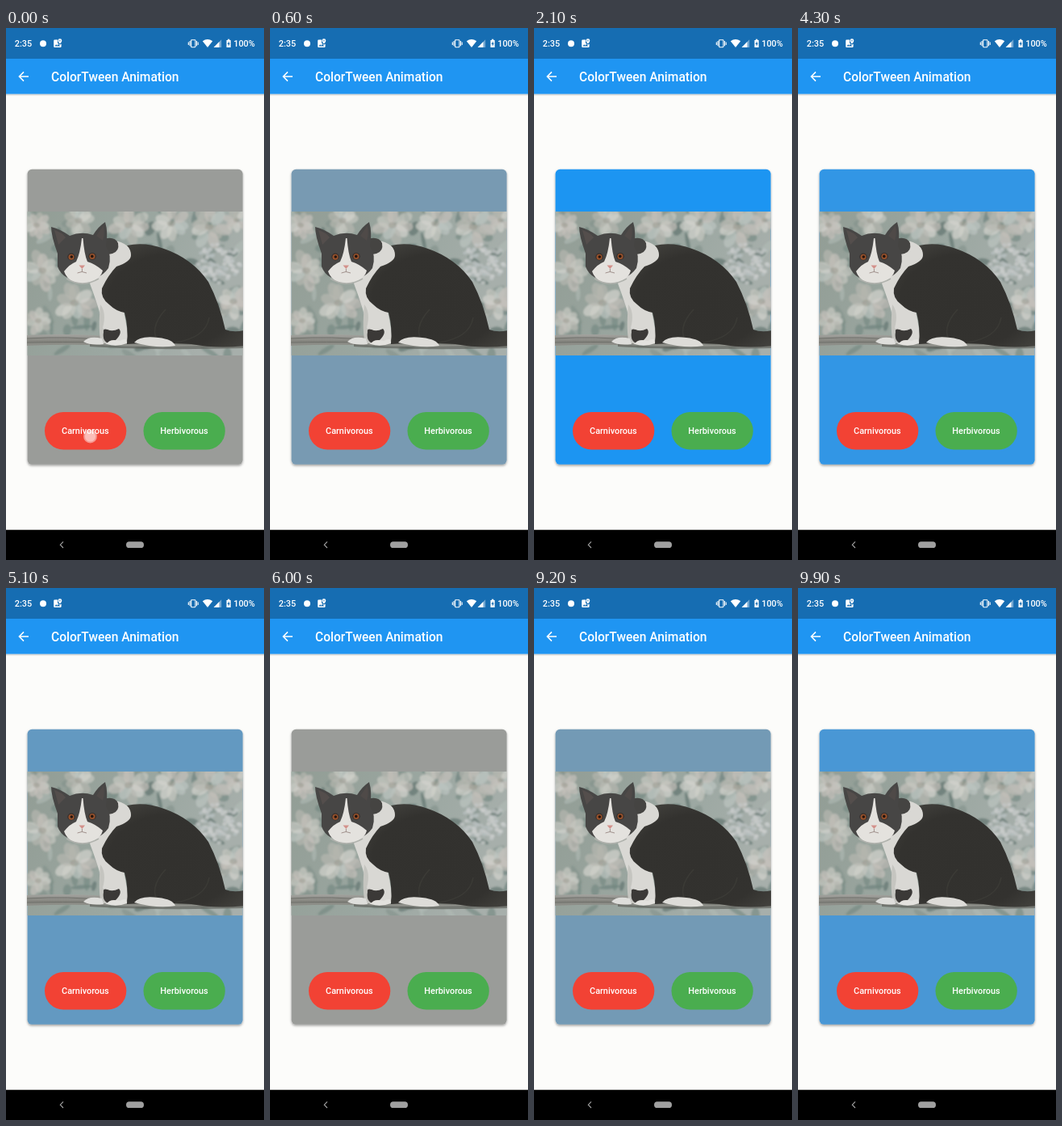
Recreate the animation shown at these times as an HTML page. Size 320x658 px, loop 10 s.

```html
<!DOCTYPE html>
<html lang="en">
<head>
<meta charset="utf-8">
<title>ColorTween Animation</title>
<style>
  html, body { margin: 0; width: 100%; height: 100%; overflow: hidden; background: #fcfcfa; }
  svg { display: block; width: 100%; height: 100%; }
  text { font-family: Roboto, sans-serif; font-weight: 500; font-size: 10.9px; fill: #fff; }
</style>
</head>
<body>
<svg viewBox="0 0 320 658">
  <defs>
    <filter id="shade" x="-10%" y="-10%" width="120%" height="120%">
      <feDropShadow dx="0" dy="1.6" stdDeviation="1.5" flood-color="#000" flood-opacity=".38"/>
    </filter>
    <filter id="soft"><feGaussianBlur stdDeviation="1.2"/></filter>
    <filter id="fur"><feGaussianBlur stdDeviation=".6"/></filter>
    <clipPath id="frame"><rect x="26.6" y="227" width="267" height="178"/></clipPath>
    <linearGradient id="wall" x2="1" y2=".3">
      <stop offset="0" stop-color="#929d95"/>
      <stop offset=".6" stop-color="#9ba7a1"/>
      <stop offset="1" stop-color="#a7afab"/>
    </linearGradient>
    <linearGradient id="plank" x2="0" y2="1">
      <stop offset="0" stop-color="#a3a39f"/>
      <stop offset=".55" stop-color="#85857f"/>
      <stop offset="1" stop-color="#92948e"/>
    </linearGradient>
    <radialGradient id="coat" cx=".5" cy=".55" r=".65">
      <stop offset="0" stop-color="#32312e"/>
      <stop offset=".7" stop-color="#33322f"/>
      <stop offset="1" stop-color="#42413d"/>
    </radialGradient>
    <linearGradient id="barShade" x2="0" y2="1">
      <stop offset="0" stop-color="#000" stop-opacity=".22"/>
      <stop offset="1" stop-color="#000" stop-opacity="0"/>
    </linearGradient>
  </defs>

  <rect width="320" height="658" fill="#fcfcfa"/>

  <!-- app bar -->
  <rect y="81.6" width="320" height="2.6" fill="url(#barShade)"/>
  <rect y="38" width="320" height="43.6" fill="#1f95f2"/>
  <rect width="320" height="38" fill="#166db2"/>
  <path d="M28 60H16.6M22 54.4L16.4 60L22 65.6" fill="none" stroke="#fff" stroke-width="1.5"/>
  <text x="56" y="65.6" style="font-size:15.57px">ColorTween Animation</text>

  <!-- status bar -->
  <text x="10.8" y="23">2:35</text>
  <text x="282.2" y="23">100%</text>
  <g fill="#fff">
    <circle cx="46" cy="19.2" r="4"/>
    <path d="M60.4 14.5H64V18.8L66.9 20.8L68.6 19.6V22.8Q68.6 24 67.4 24H60.4Q59.2 24 59.2 22.8V15.7Q59.2 14.5 60.4 14.5Z"/>
    <path d="M66.9 13.3A2.4 2.4 0 0 1 69.3 15.7Q69.3 17.3 66.9 19.6Q64.5 17.3 64.5 15.7A2.4 2.4 0 0 1 66.9 13.3Z"/>
    <path d="M60.5 22.6L62.2 20.2L63.5 21.7L65 19.8L67.2 22.6Z" fill="#166db2"/>
    <circle cx="66.9" cy="15.7" r=".7" fill="#166db2"/>
    <path d="M243.8 16.2Q250 11.9 256.2 16.2L250 24Z"/>
    <path d="M267.2 14.3V23.9H257.6Z" opacity=".4"/>
    <path d="M264.5 17V23.9H257.6Z"/>
    <path d="M275 13.8H277.3V14.9H278.7V24H273.5V14.9H275Z"/>
    <path d="M276.7 16.2L274.5 20H275.8V22.7L277.9 18.8H276.7Z" fill="#166db2"/>
  </g>
  <g fill="none" stroke="#fff" stroke-width="1.1">
    <rect x="229.6" y="14.7" width="5.3" height="9" rx=".6"/>
    <path d="M228 16V22.3M236.5 16V22.3M226.3 17.5V21M238.2 17.5V21"/>
  </g>

  <!-- card -->
  <rect id="card" x="26.6" y="174.8" width="267" height="365" rx="5.5" filter="url(#shade)"/>

  <g clip-path="url(#frame)">
    <rect x="26" y="227" width="268" height="178" fill="url(#wall)"/>
    <g id="floral" filter="url(#soft)"></g>
    <g filter="url(#fur)">
      <path d="M26 380Q90 377 150 383L294 388V394L160 394Q90 390 26 393Z" fill="url(#plank)"/>
      <path d="M26 384Q80 381 120 386M26 389Q100 387 294 393" fill="none" stroke="#6b6c67" stroke-width=".9"/>
      <path d="M104 391Q180 397 294 391V396Q180 399 104 394Z" fill="#60625c" opacity=".7"/>

      <!-- chest and foreleg -->
      <path d="M124 266Q137 259 151 270Q159 279 153 292L146 350Q149 365 151 378Q152 388 145 390L124 391Q117 380 118 358Q113 340 104 316Z" fill="#d9d8d4"/>
      <path d="M117 342Q125 352 120 371Q127 376 133 390H118Q114 374 117 342Z" fill="#c5c5c0"/>

      <!-- body -->
      <path d="M150 269Q172 264 196 273Q231 285 251 314Q265 341 272 373Q282 377 295 374V393Q262 397 230 391Q185 388 150 391Q152 371 147 352Q136 350 128 342Q117 334 119 322Q127 305 137 295Q155 289 155 281Q155 274 150 269Z" fill="url(#coat)"/>
      <path d="M190 390Q176 372 198 348M210 389Q248 383 252 358" fill="none" stroke="#45443f" stroke-width="1.5" opacity=".5"/>
      <path d="M121 376Q120 371 126 373Q132 376 140 372Q145 377 136 386L128 390Q119 388 121 376Z" fill="#3b3937"/>
      <path d="M96 388Q103 380 119 384L121 391Q105 393 96 388Z" fill="#dededb"/>
      <path d="M125 391Q128 384 141 387Q151 382 150 390Q137 395 125 391Z" fill="#e3e2de"/>
      <path d="M159 389Q166 380 189 383Q207 385 210 393Q188 397 159 389Z" fill="#dddcd8"/>
      <path d="M118 262Q134 256 139 266Q141 276 132 279L122 281Z" fill="#454442"/>

      <!-- head -->
      <path d="M64 279Q56 257 56 246Q68 249 79 257Q93 251 108 256Q114 246 123 240Q127 253 124 270Q132 281 127 297Q116 312 95 313Q70 312 64 295Z" fill="#474645"/>
      <path d="M60 250Q70 253 74 259L65 268Z" fill="#544e4c"/>
      <path d="M121 244Q123 255 120 263L112 257Z" fill="#4f4a48"/>
      <path d="M94 260Q92 279 87 289Q79 292 72 301Q75 310 84 314Q96 319 110 312Q118 308 120 300Q111 292 101 289Q97 280 95.5 260Z" fill="#e4e2de"/>
      <path d="M75 310Q95 322 115 310" fill="none" stroke="#b0b2ad" stroke-width="1.5"/>
      <g fill="#38302d">
        <ellipse cx="81" cy="283" rx="4.8" ry="4.4"/>
        <ellipse cx="107" cy="282.3" rx="4.8" ry="4.4"/>
      </g>
      <g fill="#98522c">
        <circle cx="81" cy="283.2" r="3.5"/>
        <circle cx="107" cy="282.6" r="3.5"/>
      </g>
      <g fill="#25150f">
        <circle cx="81.3" cy="283" r="1.8"/>
        <circle cx="106.8" cy="282.4" r="1.8"/>
      </g>
      <path d="M90.5 293.5H98L94.4 298Z" fill="#d3908a"/>
      <path d="M94.4 298V301.5M88.5 303Q94 300 100 303" fill="none" stroke="#8e7b77" stroke-width=".8"/>
    </g>
  </g>

  <!-- buttons -->
  <rect x="48" y="475" width="101.3" height="46.5" rx="23.2" fill="#f24234"/>
  <rect x="170.5" y="475" width="101.3" height="46.5" rx="23.2" fill="#4aad4f"/>
  <g text-anchor="middle">
    <text x="98.4" y="502.2">Carnivorous</text>
    <text x="221" y="502.2">Herbivorous</text>
  </g>
  <g id="touch">
    <circle r="8.4" fill="#fff" opacity=".45"/>
    <circle r="6.6" fill="#fff" opacity=".38"/>
  </g>

  <!-- navigation bar -->
  <rect y="620.7" width="320" height="37.3" fill="#000"/>
  <path d="M71 635.4L67.3 639.2L71 643" fill="none" stroke="#a5a5a5" stroke-width="1.1"/>
  <rect x="149" y="635.3" width="22" height="7.8" rx="3.9" fill="#a0a0a0"/>
</svg>
<script>
const LOOP = 10000, STEP = 100, TWEEN = 2000;
const GREY = [154, 156, 153], BLUE = [31, 149, 242];
const card = document.getElementById('card');
const touch = document.getElementById('touch');
const floral = document.getElementById('floral');

let seed = 11;
function rand(lo, hi) {
  seed = (seed * 16807) % 2147483647;
  return lo + (hi - lo) * seed / 2147483647;
}
const pick = list => list[Math.floor(rand(0, list.length))];

function blob(x, y, rx, ry, turn, fill, alpha) {
  const el = document.createElementNS('http://www.w3.org/2000/svg', 'ellipse');
  const attrs = { rx, ry, fill, opacity: alpha, transform: `translate(${x} ${y}) rotate(${turn})` };
  for (const key in attrs) el.setAttribute(key, attrs[key]);
  floral.append(el);
}

function flower(x, y, size, tones) {
  for (let i = 0; i < 9; i++) {
    const turn = i * 40 + rand(-12, 12), a = turn * Math.PI / 180;
    const d = size * rand(.35, .75);
    blob(x + d * Math.cos(a), y + d * Math.sin(a), size * .45, size * .28, turn, pick(tones), .7);
  }
  blob(x, y, size * .22, size * .16, 0, '#969389', .5);
}

function paintFloral() {
  const leaves = ['#657c76', '#71857f', '#82918a', '#586d68', '#b0bbb5'];
  const petals = ['#c6c7c1', '#d3d3cd', '#b5b6af', '#c5c1ba', '#bcc5c0'];
  for (let i = 0; i < 110; i++) {
    blob(rand(27, 294), rand(227, 405), rand(6, 14), rand(2, 6), rand(0, 180), pick(leaves), .6);
  }
  const spots = [[45, 300, 24], [85, 340, 25], [38, 244, 18], [90, 238, 20], [152, 244, 24],
    [205, 242, 22], [252, 246, 24], [286, 238, 15], [282, 338, 22], [40, 362, 18]];
  for (const [x, y, size] of spots) flower(x, y, size, petals);
  for (let i = 0; i < 90; i++) {
    const a = rand(0, 7), d = Math.sqrt(rand(0, 1));
    blob(264 + 27 * d * Math.cos(a), 290 + 25 * d * Math.sin(a), 2.8, 2.2, 0, pick(['#c3c7c7', '#b6bdbe', '#cbcdcc']), .75);
  }
}

const ramp = (t, start) => Math.min(1, Math.max(0, (t - start) / TWEEN));

const taps = [
  { from: 0, to: 60, x: 104.5, y: 505 },
  { from: 3800, to: 3960, x: 221, y: 505 },
  { from: 8500, to: 8560, x: 105.5, y: 504 }
];

function draw(now) {
  const t = Math.floor(now % LOOP / STEP) * STEP;
  const mix = ramp(t, 40) - ramp(t, 4000) + ramp(t, 8560);
  const rgb = GREY.map((g, i) => Math.round(g + (BLUE[i] - g) * mix));
  card.setAttribute('fill', `rgb(${rgb})`);
  const tap = taps.find(p => t >= p.from && t < p.to);
  touch.setAttribute('visibility', tap ? 'visible' : 'hidden');
  if (tap) touch.setAttribute('transform', `translate(${tap.x} ${tap.y})`);
}

function loop() {
  draw(performance.now());
  requestAnimationFrame(loop);
}

paintFloral();
loop();
</script>
</body>
</html>
```
